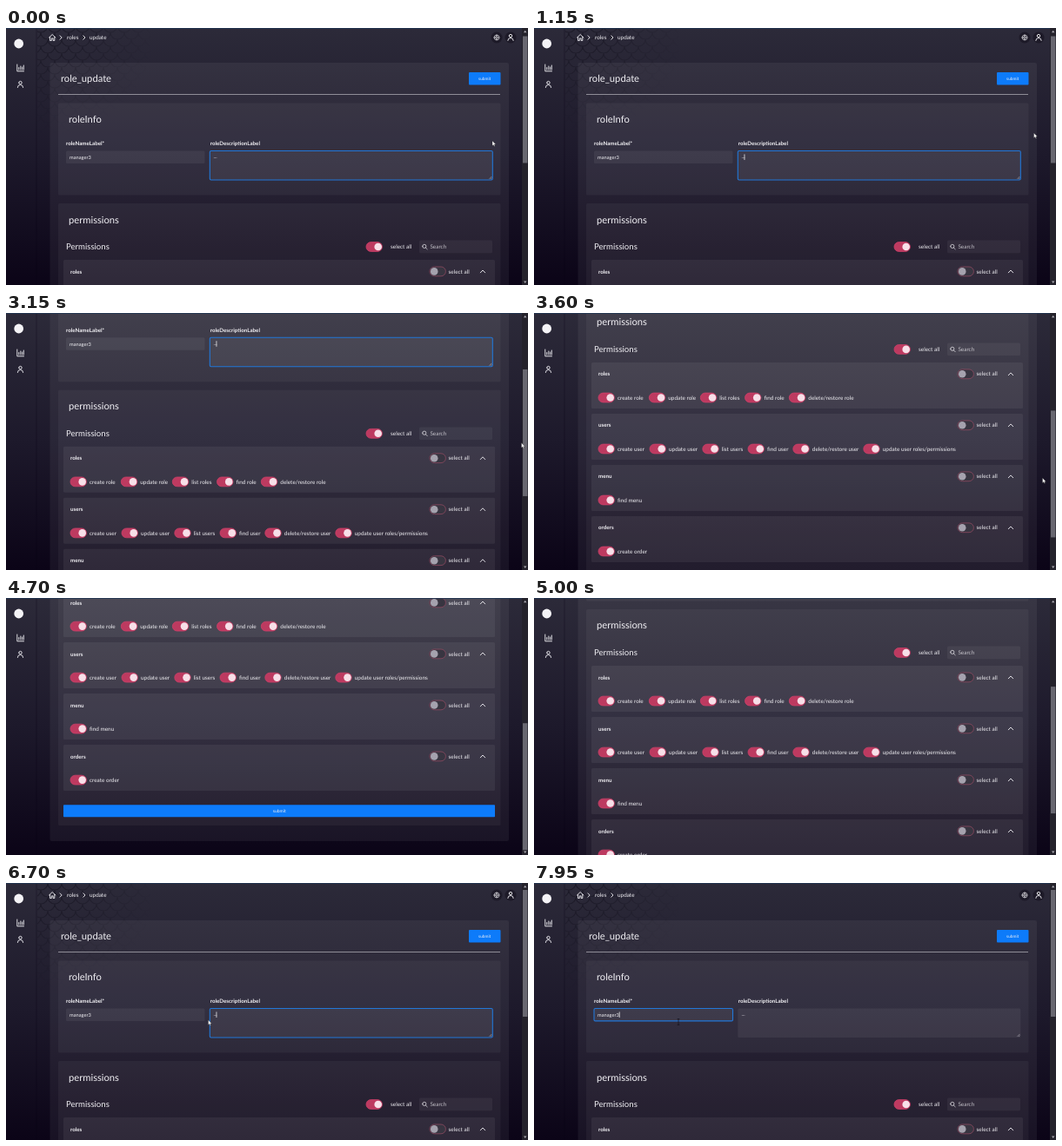
Write an HTML page that moves like this. It is 600 px wide and 296 px high and loops after 8000 ms.

```html
<!DOCTYPE html>
<html lang="en">
<head>
<meta charset="utf-8">
<title>Role update</title>
<style>
  html, body { margin: 0; width: 100%; height: 100%; overflow: hidden; background: #0c0518; }
  svg { display: block; width: 100vw; height: 100vh; }
  text { font-family: Lato, sans-serif; font-size: 6.4px; fill: #f1f0f4; text-rendering: geometricPrecision; }
  .bold { font-weight: 700; font-size: 6.2px; }
  .icon { fill: none; stroke: #f1f0f4; stroke-width: .9; stroke-linecap: round; stroke-linejoin: round; }
</style>
</head>
<body>
<svg viewBox="0 0 600 296" preserveAspectRatio="none">
  <defs>
    <linearGradient id="night" x2="0" y2="1">
      <stop stop-color="#2c2a39"/><stop offset=".5" stop-color="#1d192b"/><stop offset="1" stop-color="#0b0417"/>
    </linearGradient>
    <radialGradient id="fade" gradientUnits="userSpaceOnUse" cx="50" cy="5" r="120">
      <stop stop-color="#fff"/><stop offset="1" stop-color="#fff" stop-opacity="0"/>
    </radialGradient>
    <mask id="fadeMask"><rect x="36" width="130" height="130" fill="url(#fade)"/></mask>
    <pattern id="scales" width="16" height="16" patternUnits="userSpaceOnUse">
      <g fill="none" stroke="#171522" stroke-width="1.2">
        <path d="M0 0a8 8 0 0 0 16 0M-8 8a8 8 0 0 0 16 0M8 8a8 8 0 0 0 16 0"/>
      </g>
    </pattern>
  </defs>
  <rect width="600" height="296" fill="url(#night)"/>
  <g id="page"></g>
  <g id="chrome"></g>
  <g id="arrow"><path d="M0 0V5.6L1.3 4.5L2.2 6.3L3 5.9L2.2 4.1H3.9Z" fill="#fff" stroke="#222" stroke-width=".3"/></g>
  <path id="beam" d="M-1.3 -3.4H1.3M0 -3.4V3.4M-1.3 3.4H1.3" stroke="#15131d" stroke-width=".7"/>
</svg>
<script>
const LOOP = 8000, BLINK = 560, FOCUS_CHANGE = 7900;
const $ = id => document.getElementById(id);

const box = (x, y, w, h, fill, r = 1.5, extra = "") =>
  `<rect x="${x}" y="${y}" width="${w}" height="${h}" rx="${r}" fill="${fill}" ${extra}/>`;
const glass = (x, y, w, h, alpha, r) => box(x, y, w, h, `rgba(255,255,255,${alpha})`, r);
const label = (x, y, str, attrs = "") => `<text x="${x}" y="${y}" ${attrs}>${str}</text>`;
const sized = px => `style="font-size:${px}px"`;
const icon = (d, attrs = "") => `<path class="icon" d="${d}" ${attrs}/>`;
const person = (x, y) =>
  icon(`M${x - 3.2} ${y + 3.5}q0 -3 3.2 -3t3.2 3M${x - 1.7} ${y - 2}a1.7 1.7 0 1 0 3.4 0a1.7 1.7 0 1 0 -3.4 0`);

function toggle(x, y, on) {
  return box(x, y - 5.4, 18.4, 10.8, on ? "#bd3a60" : "#383541", 5.4,
      `stroke="${on ? "#cf416a" : "#8c4960"}" stroke-width=".8"`) +
    `<circle cx="${x + (on ? 13.7 : 5.2)}" cy="${y}" r="4.3" fill="${on ? "#f7dfe8" : "#a5a2ae"}"/>`;
}

function group(index, name, items) {
  const y = 270 + index * 59;
  let out = glass(66, y, 496, 53, .06) +
    label(74, y + 15.6, name, 'class="bold"') +
    toggle(487, y + 13.4, false) + label(508.5, y + 15.6, "select all") +
    icon(`M545.3 ${y + 14.8}l2.7 -2.8l2.7 2.8`);
  for (const [x, text] of items)
    out += toggle(x, y + 40.6, true) + label(x + 22, y + 42.8, text);
  return out;
}

$("page").innerHTML =
  `<rect x="36" width="130" height="130" fill="url(#scales)" mask="url(#fadeMask)" opacity=".75"/>` +
  // breadcrumb and header icons
  icon("M49.5 14l3.7 -3.5l3.7 3.5M50.6 13.5v4h1.7v-2.6h1.8v2.6h1.7v-4") +
  icon("M62 11.8l2.2 2.2l-2.2 2.2M88.8 11.8l2.2 2.2l-2.2 2.2") +
  label(70, 16.2, "roles") + label(96, 16.2, "update") +
  `<circle cx="564" cy="14" r="6.5" fill="#1d1a28"/><circle cx="580" cy="14" r="6.5" fill="#1d1a28"/>` +
  icon("M561 14a3 3 0 1 0 6 0a3 3 0 1 0 -6 0M561 14h6M564 11q-2.6 3 0 6q2.6 -3 0 -6", 'style="stroke-width:.6"') +
  person(580, 14) +
  // title
  glass(50.5, 43, 527.5, 515, .055, 2) +
  label(63, 65.3, "role_update", sized(11.2)) +
  box(532, 54, 36.5, 14.4, "#0d7bfa", 1) +
  label(550.2, 62.9, "submit", `text-anchor="middle" ${sized(4.8)}`) +
  box(60, 79, 508, 1, "#8f8d97", 0) +
  // role info
  glass(60, 89.5, 508.5, 106, .045) +
  label(72, 112, "roleInfo", sized(11.2)) +
  label(69, 137.8, "roleNameLabel*", 'class="bold"') +
  label(234.7, 137.8, "roleDescriptionLabel", 'class="bold"') +
  glass(69, 144.5, 159.5, 14.4, .06) + glass(234.3, 144.5, 325, 33.5, .06) +
  label(73, 154, "manager3", sized(5.7)) + label(238.6, 153.4, "...", sized(5.7)) +
  icon("M555.8 176.6l2.4 -2.4M557.4 176.7l.9 -.9", 'style="stroke-width:.4"') +
  `<rect id="focus" fill="none" stroke="#2277d8" stroke-width="1.1" rx="1.5"/>
   <rect id="caret" width=".7" height="6.6" y="148.4" fill="#fff"/>` +
  // permissions
  glass(60, 205, 508.5, 335, .045) +
  label(72, 227.5, "permissions", sized(11.2)) +
  label(69, 258.4, "Permissions", sized(9.6)) +
  toggle(414, 255, true) + label(442, 257.2, "select all") +
  box(475, 247.6, 84, 14.6, "rgba(255,255,255,.05)") +
  icon("M478.7 254.4a2.1 2.1 0 1 0 4.2 0a2.1 2.1 0 1 0 -4.2 0M482.4 256l1.8 1.8", 'style="stroke-width:.7"') +
  label(487.4, 257.2, "Search", 'fill-opacity=".75"') +
  group(0, "roles", [[74, "create role"], [132.3, "update role"], [191.3, "list roles"],
    [242.5, "find role"], [293.3, "delete/restore role"]]) +
  group(1, "users", [[74, "create user"], [133, "update user"], [193.8, "list users"],
    [246, "find user"], [297.8, "delete/restore user"], [378.8, "update user roles/permissions"]]) +
  group(2, "menu", [[74, "find menu"]]) +
  group(3, "orders", [[74, "create order"]]) +
  box(66, 516.2, 496, 14, "#0d7bfa", .8) +
  label(314.3, 524.8, "submit", `text-anchor="middle" ${sized(5)}`);

$("chrome").innerHTML =
  box(34.6, 0, .8, 296, "rgba(10,5,22,.4)", 0) +
  `<circle cx="14.7" cy="18" r="5.4" fill="#f4f3f6"/>` +
  icon("M12.8 42v7.8h7.7M14.8 48v-2.5M16.8 48v-4M18.7 48v-3M20.3 48v-5") +
  person(16.5, 65) +
  box(0, 0, 600, .8, "#1d3553", 0) +
  box(593, 0, 7, 296, "#24222b", 0) +
  `<rect id="thumb" x="594" width="5.4" height="146" fill="#686770"/>
   <path d="M595 5.2l1.7 -2.4l1.7 2.4zM595 291.5l1.7 2.4l1.7 -2.4z" fill="#aaa8b0"/>`;

// Keyframes: [time, values...], linear in between
const scrollKeys = [[0, 3], [2550, 3], [3150, 116], [3600, 213], [4250, 278], [4800, 278], [5450, 0], [LOOP, 0]];
const mouseKeys = [
  [0, 559, 130], [800, 566, 128], [1700, 588, 110], [2350, 601, 96], [2600, 598, 96],
  [3150, 592.5, 149.5], [3600, 584.5, 190], [4250, 599, 230], [4700, 602, 232], [4850, 601, 225],
  [5500, 598.5, 58], [6000, 597, 100], [6800, 181, 166], [7050, 167, 158], [7250, 166, 160], [LOOP, 166, 160]
];

function sample(keys, t) {
  const i = Math.max(1, keys.findIndex(k => k[0] >= t));
  const a = keys[i - 1], b = keys[i], p = (t - a[0]) / (b[0] - a[0]);
  return a.slice(1).map((v, n) => v + (b[n + 1] - v) * p);
}

function setAttrs(id, attrs) {
  for (const name in attrs) $(id).setAttribute(name, attrs[name]);
}

function draw(now) {
  const t = now % LOOP;
  const [scroll] = sample(scrollKeys, t);
  const [x, y] = sample(mouseKeys, t);
  const nameFocused = t >= FOCUS_CHANGE;
  const blinkOn = Math.floor((t - 7600) / BLINK) % 2 === 0;

  setAttrs("page", { transform: `translate(0 ${-scroll})` });
  setAttrs("thumb", { y: 8 + scroll * .49 });
  setAttrs("focus", nameFocused
    ? { x: 69, y: 144.5, width: 159.5, height: 14.4 }
    : { x: 234.3, y: 144.5, width: 325, height: 33.5 });
  setAttrs("caret", { x: nameFocused ? 97.8 : 241.6, opacity: nameFocused || (t > 400 && blinkOn) ? 1 : 0 });

  const docY = y + scroll;
  const overField = docY > 144 && (x > 234 && x < 559 && docY < 178 || x > 69 && x < 228 && docY < 161);
  setAttrs("arrow", { transform: `translate(${x} ${y})`, opacity: overField ? 0 : 1 });
  setAttrs("beam", { transform: `translate(${x} ${y})`, opacity: overField ? 1 : 0 });
  requestAnimationFrame(tick);
}

const start = performance.now();
function tick() { draw(performance.now() - start); }
tick();
</script>
</body>
</html>
```
